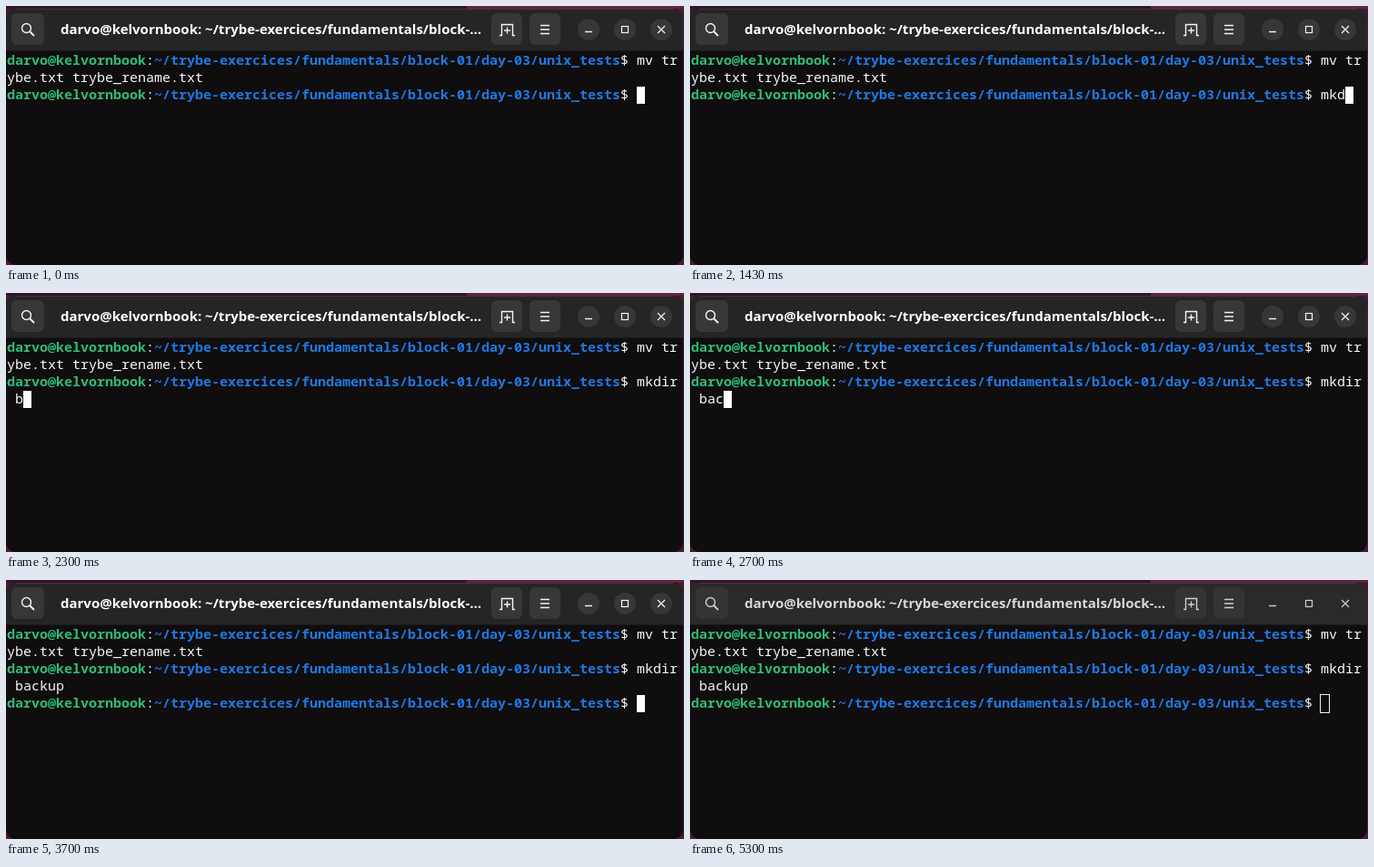
An HTML page that plays this animation: 746 px wide and 286 px high, repeating every 5.43 s.

```html
<!DOCTYPE html>
<html lang="en">
<head>
<meta charset="utf-8">
<title>Terminal</title>
<style>
  html, body { margin: 0; width: 100%; height: 100%; overflow: hidden; background: #3b1529; }
  svg { display: block; }
  text { white-space: pre; }
  .term { font: 15px "Noto Sans Mono", monospace; fill: #f7f7f7; }
  .term .host { font-weight: 700; fill: #2fbc78; }
  .term .path { font-weight: 700; fill: #2079e2; }
  .title { font: 700 15px "Open Sans", sans-serif; fill: #fff; }
  .button { fill: #373737; }
  .icon { fill: none; stroke: #f4f4f4; stroke-width: 1.4; }
  .header { fill: #252525; }
  .blurred .header { fill: #2a2a2a; }
  .blurred .button { fill: #343434; }
  .blurred .round { display: none; }
  .blurred .title { fill: #d8d8d8; }
  .blurred .icon { stroke: #cfcfcf; }
</style>
</head>
<body>
<svg id="stage" width="746" height="286" viewBox="0 0 746 286">
  <rect width="746" height="286" fill="#4b1a32"/>
  <rect width="507" height="3" fill="#35132a"/>
  <rect x="507" width="239" height="3" fill="#65213e"/>
  <rect x="0" y="3" width="745" height="283" rx="11" fill="#0f0d0e"/>
  <path class="header" d="M0 50V14a11 11 0 0 1 11-11H734a11 11 0 0 1 11 11V50z"/>
  <path d="M11 3.5H734" stroke="#3a3a3a"/>
  <path d="M0 49.5H745" stroke="#191919"/>
  <g class="button">
    <rect x="6" y="8" width="36" height="35" rx="6"/>
    <rect x="534" y="8" width="34" height="35" rx="6"/>
    <rect x="576" y="8" width="34" height="35" rx="6"/>
    <g class="round">
      <circle cx="641" cy="26" r="12"/>
      <circle cx="681" cy="26" r="12"/>
      <circle cx="721" cy="26" r="12"/>
    </g>
  </g>
  <g class="icon">
    <circle cx="22.5" cy="24.5" r="5"/>
    <path d="M26 28l5 5" stroke-width="1.8"/>
    <path d="M543 32.5H545.5V20.5H557.5V32.5H560M551.5 23.5v7M548 27h7"/>
    <path d="M588 21.5h10M588 26h10M588 30.5h10"/>
    <path d="M637 28.5h8"/>
    <rect x="677.5" y="22.5" width="7" height="7" stroke-width="1.2"/>
    <path d="M717 22l8 8M725 22l-8 8" stroke-width="1.2"/>
  </g>
  <text class="title" id="title" x="60" y="31"></text>
  <g class="term" id="rows"></g>
  <rect id="cursor"/>
</svg>
<script>
const LOOP = 5430, COLS = 82, CELL = 9, LINE = 19, LEFT = 1, TOP = 51;
const HOST = "darvo@kelvornbook";
const PATH = "~/trybe-exercices/fundamentals/block-01/day-03/unix_tests";
const PROMPT = HOST + ":" + PATH + "$ ";
const COMMAND = "mkdir backup";
const KEY_TIMES = [900, 1100, 1430, 1570, 1770, 1830, 2300, 2370, 2700, 2770, 3030, 3430];
const ENTER = 3700, HOLLOW = 5230, BLUR = 5300;

const byId = id => document.getElementById(id);
const stage = byId("stage"), rows = byId("rows"), cursor = byId("cursor");
byId("title").textContent = HOST + ": " + PATH.slice(0, 37) + "…";

function setAttrs(node, attrs) {
  for (const key in attrs) node.setAttribute(key, attrs[key]);
  return node;
}

function addSvg(parent, tag, attrs, text = "") {
  const node = setAttrs(document.createElementNS("http://www.w3.org/2000/svg", tag), attrs);
  node.textContent = text;
  return parent.appendChild(node);
}

function addText(row, col, text, kind = "") {
  return addSvg(rows, "text", { x: LEFT + col * CELL, y: TOP + row * LINE + 14, class: kind }, text);
}

function addPrompt(row) {
  addText(row, 0, HOST, "host");
  addText(row, HOST.length, ":");
  addText(row, HOST.length + 1, PATH, "path");
  return addText(row, PROMPT.length - 2, "$ ");
}

addPrompt(0);
addText(0, PROMPT.length, "mv tr");
addText(1, 0, "ybe.txt trybe_rename.txt");
addPrompt(2);
const head = addText(2, PROMPT.length, "");
const tail = addText(3, 0, "");
const outer = rows;
const nextPrompt = addSvg(outer, "g", {});
const before = rows.childNodes.length;
addPrompt(4);
nextPrompt.append(...[...rows.childNodes].slice(before));

function placeCursor(row, col, hollow) {
  const grow = hollow ? 0.5 : 0;
  setAttrs(cursor, {
    x: LEFT + col * CELL - grow,
    y: TOP + row * LINE - grow,
    width: CELL + 2 * grow,
    height: LINE + 2 * grow,
    fill: hollow ? "none" : "#fff",
    stroke: hollow ? "#f0f0f0" : "none"
  });
}

function render(time) {
  const typed = KEY_TIMES.filter(t => t <= time).length;
  const room = COLS - PROMPT.length;
  const entered = time >= ENTER;
  head.textContent = COMMAND.slice(0, Math.min(typed, room));
  tail.textContent = COMMAND.slice(room, Math.max(typed, room));
  nextPrompt.setAttribute("visibility", entered ? "visible" : "hidden");
  stage.classList.toggle("blurred", time >= BLUR);

  if (entered) placeCursor(4, PROMPT.length, time >= HOLLOW);
  else if (typed < room) placeCursor(2, PROMPT.length + typed, false);
  else placeCursor(3, typed - room, false);
}

const start = performance.now();
function tick() {
  render((performance.now() - start) % LOOP);
  requestAnimationFrame(tick);
}
render(0);
requestAnimationFrame(tick);
</script>
</body>
</html>
```
